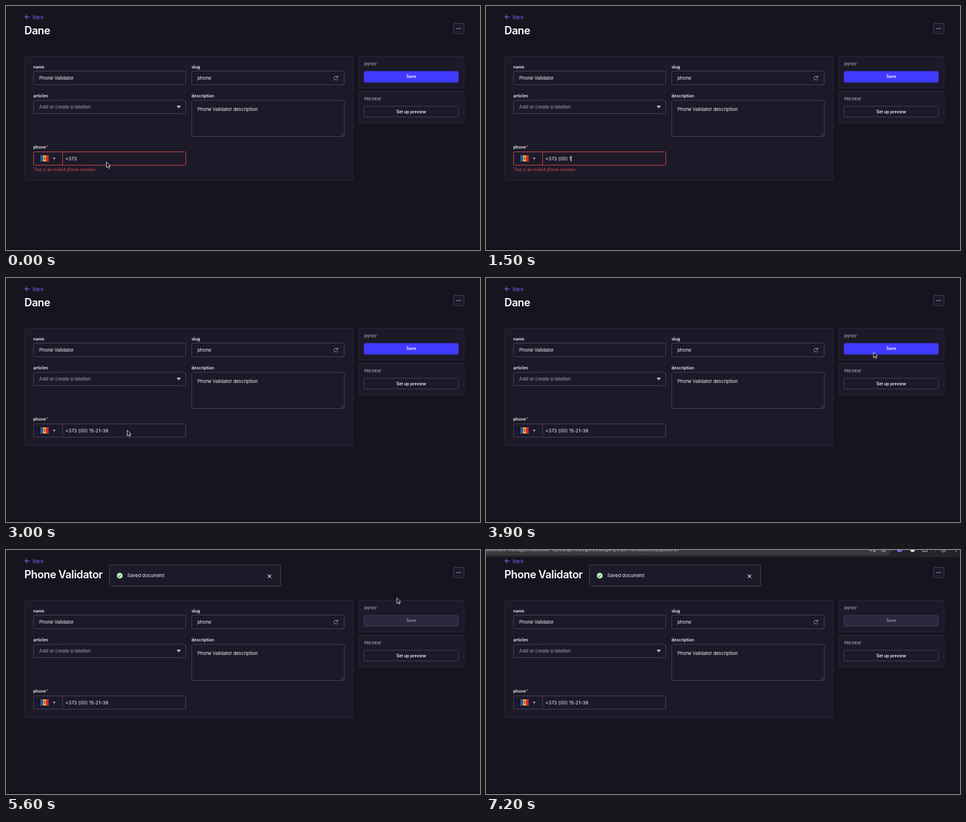
An HTML page that plays this animation: 800 px wide and 414 px high, repeating every 7.3 s.

```html
<!DOCTYPE html>
<html lang="en">
<head>
<meta charset="utf-8">
<title>Phone field validation</title>
<style>
  html, body { margin: 0; width: 100%; height: 100%; overflow: hidden; background: #16141f; }
  svg { display: block; width: 100vw; height: 100vh; }
  text { font: 8px Inter, "Open Sans", sans-serif; fill: #f2f2f6; white-space: pre; }
  .body { letter-spacing: -.01em; }
  .label { font-size: 7px; font-weight: 600; }
  .head { font-size: 6.3px; font-weight: 600; fill: #9a99b0; }
  .option { font-size: 7.7px; font-weight: 500; }
  .title { font-size: 18px; font-weight: 600; letter-spacing: -.02em; fill: #fff; }
  .panel { fill: #1c1a29; stroke: #29273a; }
  .field { fill: #1c1a29; stroke: #434159; }
  .mid { text-anchor: middle; }
</style>
</head>
<body>
<svg viewBox="0 0 800 414" preserveAspectRatio="none">
  <rect width="800" height="414" fill="#16141f"/>
  <rect y="412" width="800" height="2" fill="#0d0c13"/>

  <g fill="none" stroke="#706cff" stroke-width="1.1">
    <path d="M39.8 18.6H32.6M35.8 15.2L32.4 18.6L35.8 22"/>
  </g>
  <text x="45" y="21.6" style="fill:#706cff">Back</text>
  <text id="title" class="title" x="31" y="47.7"></text>

  <rect class="field" x="755.5" y="29.5" width="17.5" height="17.5" rx="2"/>
  <g fill="#e4e4ec">
    <circle cx="761.4" cy="38.3" r=".75"/><circle cx="764.2" cy="38.3" r=".75"/><circle cx="767" cy="38.3" r=".75"/>
  </g>

  <rect id="form" class="panel" x="31.5" y="85.5" width="553.5" rx="2"/>
  <rect class="panel" x="595.5" y="85.5" width="177.5" height="53.5" rx="2"/>
  <rect class="panel" x="595.5" y="144.5" width="177.5" height="53.5" rx="2"/>

  <text class="label" x="46" y="106">name</text>
  <rect class="field" x="46.5" y="110.5" width="257" height="23" rx="2"/>
  <text class="body" x="56" y="125.4">Phone Validator</text>

  <text class="label" x="313" y="106">slug</text>
  <rect class="field" x="313.5" y="110.5" width="257.5" height="23" rx="2"/>
  <text class="body" x="323" y="125.4">phone</text>
  <path d="M559.3 120.3A3.2 3.2 0 1 0 559.6 124.2M560.2 118.7V121.2H557.6" fill="none" stroke="#b4b3c6" stroke-width=".9"/>

  <text class="label" x="46" y="155">articles</text>
  <rect class="field" x="46.5" y="160" width="257" height="22.5" rx="2"/>
  <text class="body" x="56" y="174" style="fill:#a3a2b8">Add or create a relation</text>
  <path d="M288 169.2H295.2L291.6 173.4Z" fill="#d2d1df"/>

  <text class="label" x="313" y="155">description</text>
  <rect class="field" x="313.5" y="160" width="257.5" height="61.5" rx="2"/>
  <text class="body" x="323" y="178">Phone Validator description</text>
  <path d="M565.5 219.5L569.5 215.5M568 219.5L569.5 218" stroke="#8f8ea0" stroke-width=".7"/>

  <text class="label" x="46" y="242.3">phone<tspan fill="#ee5e52">*</tspan></text>
  <g id="phoneBox">
    <rect x="46.5" y="247.5" width="257" height="22.5" rx="2" fill="#1c1a29"/>
    <path d="M95.5 247.5V270"/>
  </g>
  <g>
    <rect x="58" y="253.5" width="14" height="10.3" rx="1" fill="#f5c32c"/>
    <path d="M62.6 253.5H59Q58 253.5 58 254.5V262.8Q58 263.8 59 263.8H62.6Z" fill="#1d55b5"/>
    <path d="M67.4 253.5H71Q72 253.5 72 254.5V262.8Q72 263.8 71 263.8H67.4Z" fill="#d3293b"/>
    <path d="M63.2 256.5H66.8L66.2 260.2L65 261.6L63.8 260.2Z" fill="#a5672c"/>
  </g>
  <path d="M79 257.8H83.6L81.3 260.4Z" fill="#d2d1df"/>
  <text id="phone" x="100" y="261.6"></text>
  <rect id="caret" y="254" width=".9" height="10" fill="#fff"/>
  <text id="error" x="46" y="279.6" style="font-size:7px;fill:#d64e44">This is an invalid phone number</text>

  <text class="head" x="604.5" y="101.3">ENTRY</text>
  <rect id="save" x="604.5" y="111" width="159" height="18.3" rx="2"/>
  <text id="saveText" class="label mid" x="684" y="122.4">Save</text>
  <text class="head" x="604.5" y="160.4">PREVIEW</text>
  <rect class="field" x="604.5" y="170" width="159" height="18.3" rx="2"/>
  <text class="label mid" x="684" y="181.7">Set up preview</text>

  <g id="menu">
    <rect x="152.5" y="272" width="105.5" height="132.5" rx="3" fill="#1b1b1b"/>
  </g>

  <g id="toast">
    <rect class="field" x="174.5" y="25.5" width="289" height="36" rx="2"/>
    <circle cx="192" cy="43.6" r="4.9" fill="#c6f0c2"/>
    <path d="M189.7 43.7L191.4 45.4L194.4 42" fill="none" stroke="#2f6846" stroke-width="1.1"/>
    <text class="body" x="204.7" y="46.4">Saved document</text>
    <path d="M441.8 41.6L447.6 47.4M447.6 41.6L441.8 47.4" stroke="#e4e4ec" stroke-width="1.1"/>
  </g>

  <g id="bar">
    <rect width="800" height="12.5" fill="#252429"/>
    <path d="M0 0H684.5Q683 9 674 9H0Z" fill="#3a393e"/>
    <text class="body" x="-2" y="1.9" style="fill:#c9c8cf">n/content-manager/collection-types/api::category.category/m207vorikaii8ky52ypikld727</text>
    <g fill="none" stroke="#c3c2ca" stroke-width="1">
      <path d="M647 0Q649 3 651.5 1M654 0V2.2H657V0M667 3L670 1L673 3V0M737 0V2.6H744.5V0"/>
    </g>
    <path d="M694 0H703L701 3H694Z" fill="#7a68e8"/>
    <circle cx="720" cy="-.6" r="3.8" fill="#ececf0"/>
    <path d="M758.5 0V4" stroke="#4a494f"/>
    <circle cx="772" cy="-.5" r="5" fill="#72564f"/>
    <circle cx="793" cy="2" r=".9" fill="#c3c2ca"/>
  </g>

  <path id="cursor" d="M0 0V9.2L2.2 7.2L3.7 10.6L5.3 9.9L3.8 6.6H6.7Z" fill="#0c0c10" stroke="#fff" stroke-width=".8" stroke-linejoin="round"/>
</svg>
<script>
const LOOP = 7300, STEP = 100;
const $ = id => document.getElementById(id);
const show = (id, on) => $(id).setAttribute("visibility", on ? "visible" : "hidden");
const attrs = (id, map) => { for (const k in map) $(id).setAttribute(k, map[k]); };

const numbers = ["+37300252638", "+373 002 52 638", "+373 (00) 25-26-38",
                 "+37300839950", "+373 009 51 180", "+37300738252"];
numbers.forEach((value, i) => {
  const row = document.createElementNS("http://www.w3.org/2000/svg", "text");
  row.setAttribute("class", "option");
  row.setAttribute("x", 159.3);
  row.setAttribute("y", 290.5 + i * 20.9);
  row.textContent = value;
  $("menu").append(row);
});

// Each key press: time and length of the masked value after it
const full = "+373 (00) 15-21-36";
const keys = [[0, 4], [1100, 7], [1300, 10], [1500, 11], [1700, 13], [1900, 14], [2100, 16], [2300, 17], [2500, 18]];

// Pointer path: time, x, y
const path = [[0, 169.5, 264.8], [100, 169.5, 264.8], [300, 174, 259], [2900, 174, 259], [3100, 235, 258],
              [3300, 355, 254], [3400, 355, 254], [3600, 545, 176], [3800, 648, 130], [3900, 654, 126],
              [4300, 655, 123.5], [5400, 655, 123.5], [5700, 662, 60], [5900, 668, 2]];

function pointer(t) {
  const i = path.findIndex(p => p[0] > t);
  if (i < 0) return path[path.length - 1].slice(1);
  const [t0, x0, y0] = path[i - 1], [t1, x1, y1] = path[i];
  const k = (t - t0) / (t1 - t0);
  return [x0 + (x1 - x0) * k, y0 + (y1 - y0) * k];
}

function saveStyle(t) {
  if (t >= 5300) return ["#2a283d", "#434159", "#8f8ea6"];
  if (t >= 4100) return ["#6c67ff", "#6c67ff", "#fff"];
  return ["#403aff", "#403aff", "#fff"];
}

function draw(t) {
  const invalid = t < 2500;
  $("title").textContent = t < 5100 ? "Dane" : "Phone Validator";

  const typed = keys.filter(k => k[0] <= t).pop()[1];
  $("phone").textContent = full.slice(0, typed);
  attrs("caret", { x: 100.3 + $("phone").getComputedTextLength() });
  show("caret", (t >= 300 && t < 700) || (t >= 1100 && t < 3000));

  attrs("form", { height: invalid ? 210.5 : 199 });
  attrs("phoneBox", { stroke: invalid ? "#cf4a41" : "#434159" });
  show("error", invalid);
  show("menu", t >= 300 && t < 1100);

  const [fill, stroke, ink] = saveStyle(t);
  attrs("save", { fill, stroke });
  $("saveText").style.fill = ink;
  show("toast", t >= 5200);
  show("bar", t >= 5900);

  const [x, y] = pointer(t);
  attrs("cursor", { transform: `translate(${x} ${y})` });
  show("cursor", t < 1100 || (t >= 2900 && t < 5900));
}

function tick() {
  const t = performance.now() % LOOP;
  draw(Math.floor(t / STEP) * STEP);
  requestAnimationFrame(tick);
}
tick();
</script>
</body>
</html>
```
